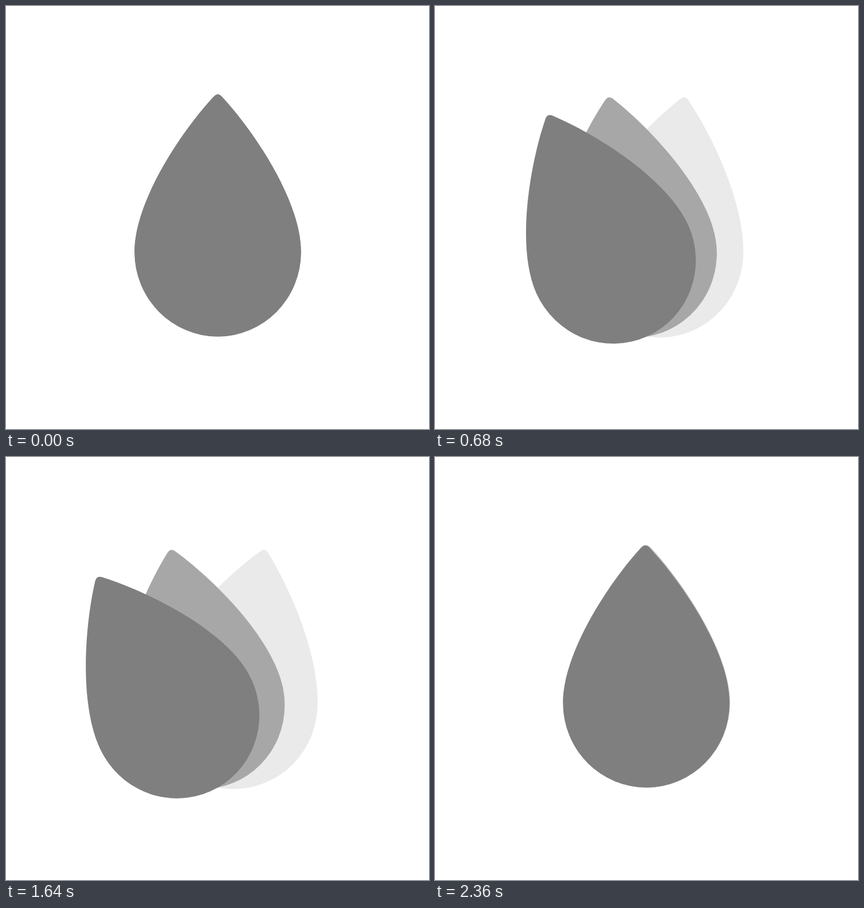
Recreate the animation shown at these times as an HTML page. Size 748 by 748 pixels, loop 2400 ms.

```html
<!DOCTYPE html>
<html lang="en">
<head>
<meta charset="utf-8">
<title>Unfolding petals</title>
<style>
  html, body { margin: 0; width: 100%; height: 100%; overflow: hidden; background: #fff; }
  svg { display: block; width: 100%; height: 100%; }
</style>
</head>
<body>
<svg viewBox="0 0 748 748">
  <defs>
    <!-- the foot of the petal is the origin -->
    <path id="petal" d="M-7 -424.5 Q0 -432.1 7 -424.5 C63 -364.5 147.2 -240.2 147.2 -149.5
      A147.2 149.5 0 0 1 -147.2 -149.5 C-147.2 -240.2 -63 -364.5 -7 -424.5Z"/>
  </defs>
  <g transform="translate(374.5 584.5)">
    <use class="petal" href="#petal" fill="#eaeaea"/>
    <use class="petal" href="#petal" fill="#a7a7a7"/>
    <use class="petal" href="#petal" fill="#7f7f7f"/>
  </g>
</svg>
<script>
  const LOOP = 2400, HALF = LOOP / 2;
  const ANGLES = [15, -15, -40];
  const petals = document.querySelectorAll('.petal');

  // Cubic easing with flat ends; x1 and x2 are the handle positions.
  function ease(x, x1, x2) {
    let lo = 0, hi = 1;
    for (let i = 0; i < 30; i++) {
      const s = (lo + hi) / 2, r = 1 - s;
      if (3 * s * r * r * x1 + 3 * s * s * r * x2 + s * s * s < x) lo = s;
      else hi = s;
    }
    return lo * lo * (3 - 2 * lo);
  }

  function draw(ms) {
    const t = ms % LOOP;
    const open = t < HALF
      ? ease(t / HALF, 1 / 3, 2 / 3)
      : 1 - ease(t / HALF - 1, 1 / 3, 5 / 6);
    petals.forEach((p, i) => p.setAttribute('transform', `rotate(${(ANGLES[i] * open).toFixed(3)})`));
  }

  const start = performance.now();
  function tick() {
    draw(performance.now() - start);
    requestAnimationFrame(tick);
  }
  draw(0);
  requestAnimationFrame(tick);
</script>
</body>
</html>
```
